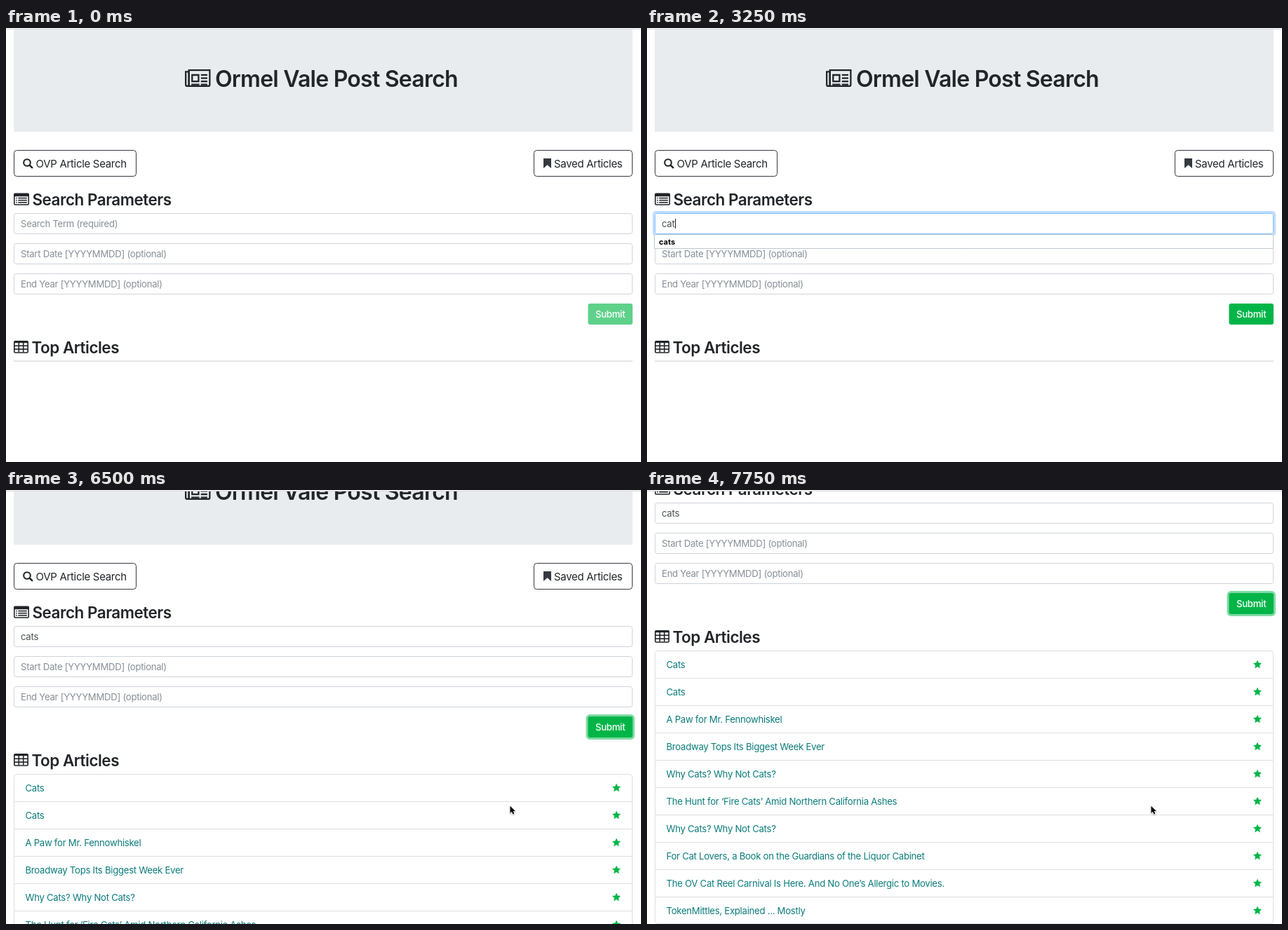
Animation of 905x619 px, one loop 8000 ms. Source, as an HTML page with a canvas:

```html
<!DOCTYPE html>
<html lang="en">
<head>
<meta charset="utf-8">
<title>Article search</title>
<style>
  html, body { margin: 0; width: 100%; height: 100%; overflow: hidden; background: #fff; }
  canvas { display: block; }
</style>
</head>
<body>
<canvas id="stage" width="905" height="619"></canvas>
<script>
const ctx = document.getElementById('stage').getContext('2d');
const W = 905, H = 619, LOOP = 8000, STEP = 250;
const LEFT = 11, RIGHT = 893, ROW = 39, LIST_TOP = 475;
const INK = '#212529', DARK = '#343a40', GREEN = '#00b548', MUTED = '#868e96';
const FONT = 'Inter, "Open Sans", sans-serif';

const articles = [
  'Cats',
  'Cats',
  'A Paw for Mr. Fennowhiskel',
  'Broadway Tops Its Biggest Week Ever',
  'Why Cats? Why Not Cats?',
  'The Hunt for ‘Fire Cats’ Amid Northern California Ashes',
  'Why Cats? Why Not Cats?',
  'For Cat Lovers, a Book on the Guardians of the Liquor Cabinet',
  'The OV Cat Reel Carnival Is Here. And No One’s Allergic to Movies.',
  'TokenMittles, Explained ... Mostly'
];

// Keyframes: [step, ...values], held until the next one.
const pointerKeys = [
  [0], [3, 302, 110], [4, 240, 175], [5, 150, 262], [6, 112.5, 288], [11],
  [16, 330, 335], [17, 700, 395], [18, 851, 414.5], [19, 852, 420],
  [20, 851, 414.5], [23, 803.5, 416], [24, 745, 438], [25, 718, 450]
];
const scrollKeys = [[0, 0], [26, 70], [27, 195], [28, 250], [29, 251], [30, 248], [31, 246]];
const typedKeys = [[0, ''], [11, 'c'], [12, 'ca'], [13, 'cat'], [14, 'cats']];
const focusKeys = [[0, 0], [9, 1], [20, 0.4], [21, 0]];

const at = (keys, step) => keys.filter(k => k[0] <= step).pop().slice(1);

function text(str, x, y, size, color, weight = 400, track = -0.0205) {
  ctx.font = `${weight} ${size}px ${FONT}`;
  ctx.letterSpacing = `${size * track}px`;
  ctx.fillStyle = color;
  ctx.fillText(str, x, y);
}

const small = (str, x, y, color, weight) => text(str, x, y, 13.15, color, weight);

function rect(x, y, w, h, color) {
  ctx.fillStyle = color;
  ctx.fillRect(x, y, w, h);
}

function box(x, y, w, h, r, fill, stroke) {
  ctx.beginPath();
  ctx.roundRect(x, y, w, h, r);
  if (fill) { ctx.fillStyle = fill; ctx.fill(); }
  if (stroke) {
    ctx.beginPath();
    ctx.roundRect(x + 0.5, y + 0.5, w - 1, h - 1, r);
    ctx.strokeStyle = stroke;
    ctx.lineWidth = 1;
    ctx.stroke();
  }
}

function poly(points, color) {
  ctx.beginPath();
  points.forEach(([x, y]) => ctx.lineTo(x, y));
  ctx.closePath();
  ctx.fillStyle = color;
  ctx.fill();
}

// Icons are drawn on a grid whose unit is the line thickness.
function icon(x, y, unit, draw) {
  ctx.save();
  ctx.translate(x, y);
  ctx.scale(unit, unit);
  ctx.fillStyle = ctx.strokeStyle = INK;
  ctx.lineWidth = 1;
  draw();
  ctx.restore();
}

function frame(x, y, w, h, r) {
  ctx.beginPath();
  ctx.roundRect(x + 0.5, y + 0.5, w - 1, h - 1, r);
  ctx.stroke();
}

function newspaper() {
  frame(2, 0, 14, 11, [0, 0, 1, 0]);
  ctx.beginPath();
  ctx.moveTo(2, 1.5);
  ctx.lineTo(0.5, 1.5);
  ctx.lineTo(0.5, 9.5);
  ctx.quadraticCurveTo(0.5, 10.5, 1.5, 10.5);
  ctx.lineTo(3, 10.5);
  ctx.moveTo(2.5, 1);
  ctx.lineTo(2.5, 9.5);
  ctx.quadraticCurveTo(2.5, 10.5, 1.5, 10.5);
  ctx.stroke();
  frame(4, 3, 5, 5, 0);
  ctx.fillRect(4, 9, 5, 1);
  for (let y = 3; y <= 9; y += 2) ctx.fillRect(10, y, 4, 1);
}

function listIcon() {
  frame(0, 0, 14, 11, 0.8);
  ctx.fillRect(0.5, 0.5, 13, 2.5);
  for (let y = 4; y <= 8; y += 2) {
    ctx.fillRect(2, y, 1, 1);
    ctx.fillRect(4, y, 8, 1);
  }
}

function tableIcon() {
  frame(0, 0, 13, 11, 0.8);
  ctx.fillRect(0.5, 0.5, 12, 1.5);
  for (const y of [4, 7]) ctx.fillRect(0.5, y, 12, 1);
  for (const x of [4, 8]) ctx.fillRect(x, 1, 1, 9);
}

function magnifier() {
  ctx.lineWidth = 2.1;
  ctx.beginPath();
  ctx.arc(6, 6, 4.8, 0, Math.PI * 2);
  ctx.stroke();
  ctx.lineWidth = 2.6;
  ctx.lineCap = 'round';
  ctx.beginPath();
  ctx.moveTo(9.8, 9.8);
  ctx.lineTo(13.2, 13.2);
  ctx.stroke();
}

function star(cx, cy, r) {
  const points = Array.from({ length: 10 }, (_, i) => {
    const a = -Math.PI / 2 + i * Math.PI / 5, d = i % 2 ? r * 0.48 : r;
    return [cx + d * Math.cos(a), cy + d * Math.sin(a)];
  });
  poly(points, GREEN);
}

function header() {
  rect(LEFT, 0, RIGHT - LEFT, 148, '#e9ecef');
  icon(255, 59, 36.5 / 16, newspaper);
  text('Ormel Vale Post Search', 298, 84, 32, INK, 600, -0.0235);

  box(LEFT, 174, 175, 38, 4, '#fff', DARK);
  icon(24, 186, 1, magnifier);
  text('OVP Article Search', 42.5, 198.5, 15, INK);

  box(752, 174, 141, 38, 4, '#fff', DARK);
  poly([[766, 186], [777, 186], [777, 200], [771.5, 195.2], [766, 200]], DARK);
  text('Saved Articles', 781, 198.5, 15, INK);
}

function field(y, label, color, focus = 0) {
  if (focus) {
    box(LEFT - 3, y - 3, RIGHT - LEFT + 6, 36, 5, `rgba(0,123,255,${0.25 * focus})`);
  }
  box(LEFT, y, RIGHT - LEFT, 30, 3, '#fff', focus ? '#80bdff' : '#ced4da');
  small(label, 21, y + 19.7, color);
}

function form(step) {
  const [typed] = at(typedKeys, step), [focus] = at(focusKeys, step);
  icon(11, 235.5, 22 / 14, listIcon);
  text('Search Parameters', 37.5, 253, 22.5, INK, 600, -0.023);

  field(307, 'Start Date [YYYYMMDD] (optional)', MUTED);
  field(350, 'End Year [YYYYMMDD] (optional)', MUTED);
  field(264, typed || 'Search Term (required)', typed ? '#495057' : MUTED, focus);

  if (focus === 1) {
    const x = typed ? 21.5 + ctx.measureText(typed).width : 21.5;
    rect(Math.round(x), 272, 1, 14, INK);
    if (typed) {
      box(10, 294, 883, 21, 0, '#fff', '#bcc6d0');
      text('cats', 17, 309, 11, '#000', 700, 0);
    }
  }
}

function submit(step) {
  const pressed = step >= 20 && step < 25;
  if (step >= 20) box(826.6, 390.1, 69.3, 35.8, 5.5, 'rgba(0,181,72,.5)');
  const color = step < 11 ? '#5fd18b' : pressed ? '#00963b' : GREEN;
  box(829.5, 393, 63.5, 30, 3, color);
  small('Submit', 840, 412.7, '#fff', 500);
}

function results(step) {
  icon(11, 446, 21 / 13, tableIcon);
  text('Top Articles', 36.5, 463.5, 22.5, INK, 600, -0.023);
  if (step < 25) {
    rect(LEFT, 474.5, RIGHT - LEFT, 1.2, '#d3d5d7');
    return;
  }
  box(LEFT, LIST_TOP, RIGHT - LEFT, ROW * articles.length, 4, '#fff', '#dfdfdf');
  articles.forEach((title, i) => {
    const y = LIST_TOP + ROW * i;
    if (i) rect(LEFT, y, RIGHT - LEFT, 1, '#dfdfdf');
    small(title, 27.5, y + 24.6, '#0b7b7b');
    star(870, y + 20, 6.4);
  });
}

function pointer(x, y) {
  ctx.save();
  ctx.translate(x, y);
  ctx.lineJoin = 'round';
  ctx.shadowColor = 'rgba(0,0,0,.3)';
  ctx.shadowBlur = 2;
  ctx.shadowOffsetY = 1;
  ctx.beginPath();
  [[0.5, 0.8], [0.5, 11], [2.9, 8.8], [4.5, 12.4], [6.3, 11.6], [4.8, 8.1], [8, 8]]
    .forEach(p => ctx.lineTo(...p));
  ctx.closePath();
  ctx.strokeStyle = '#fff';
  ctx.lineWidth = 1.6;
  ctx.stroke();
  ctx.shadowColor = 'transparent';
  ctx.fillStyle = '#000';
  ctx.fill();
  ctx.restore();
}

function draw(step) {
  const [scroll] = at(scrollKeys, step), [px, py] = at(pointerKeys, step);
  rect(0, 0, W, H, '#fff');
  ctx.save();
  ctx.translate(0, -scroll);
  header();
  form(step);
  submit(step);
  results(step);
  ctx.restore();

  rect(0, 0, W, 1, '#f6f6f6');
  rect(0, 1, W, 1, '#d9dadb');
  if (px !== undefined) pointer(px, py);
}

const start = performance.now();
function tick() {
  draw(Math.floor((performance.now() - start) % LOOP / STEP));
  requestAnimationFrame(tick);
}
tick();
</script>
</body>
</html>
```
